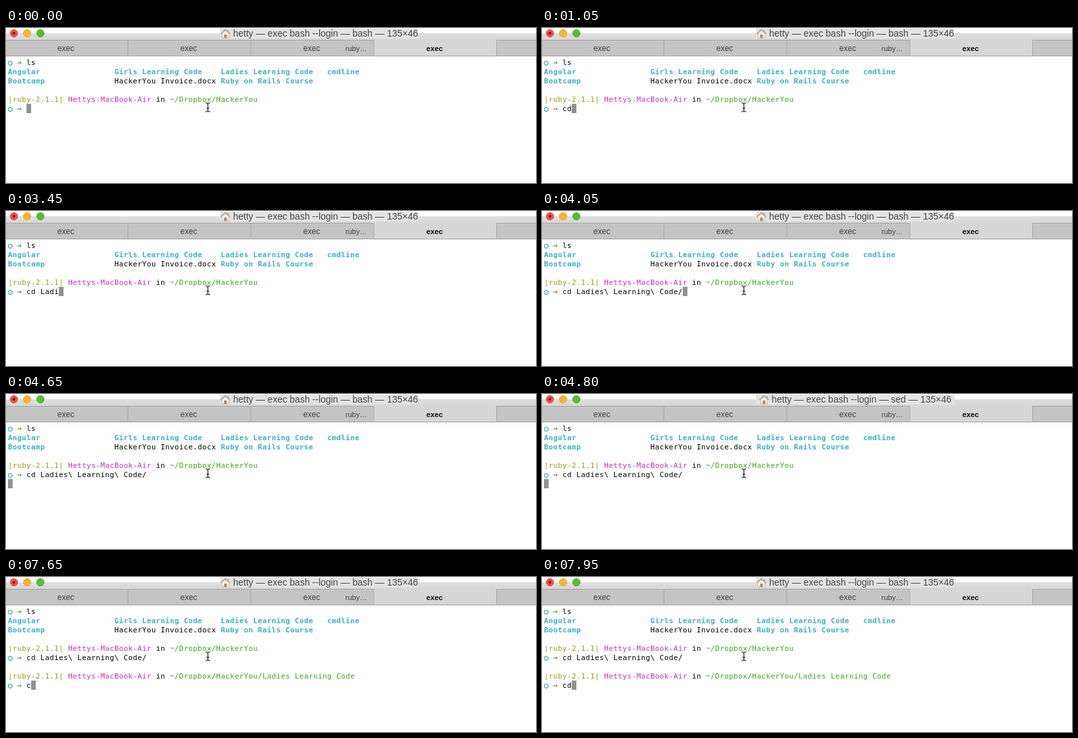
Animation, 802 px wide and 235 px high, one loop 8000 ms. Source, as an HTML page:

```html
<!DOCTYPE html>
<html lang="en">
<head>
<meta charset="utf-8">
<title>Terminal</title>
<style>
html, body { margin: 0; width: 100%; height: 100%; overflow: hidden; background: #fefefe; }
svg { position: absolute; left: 0; top: 0; }
svg text { font-family: "Liberation Sans", Arial, sans-serif; }
pre {
  position: absolute; left: 3px; top: 46px; margin: 0; color: #000;
  font: 11px/14px "DejaVu Sans Mono", monospace; letter-spacing: .378px; font-variant-ligatures: none;
}
pre b { color: #3cb0c4; }
.ring { color: #36a5be; -webkit-text-stroke: .5px; }
.arrow { color: #3fb01f; -webkit-text-stroke: .3px; }
.ruby { color: #9a9a1c; }
.host { color: #c42fc8; }
.path { color: #3fa81c; }
.cursor {
  display: inline-block; position: relative; top: -1px; width: 7px; height: 14px;
  vertical-align: top; background: #919191;
}
</style>
</head>
<body>
<pre id="screen"></pre>
<svg width="802" height="235">
  <linearGradient id="bar" x2="0" y2="1">
    <stop stop-color="#dedede"/>
    <stop offset="1" stop-color="#d6d6d6"/>
  </linearGradient>
  <rect y="8" width="802" height="11" fill="url(#bar)"/>
  <rect x="324" y="1" width="300" height="15" fill="#e3e3e3"/>
  <g stroke-width="1">
    <circle cx="12" cy="8" r="5.5" fill="#fc4f4b" stroke="#dd3c38"/>
    <circle cx="32" cy="8" r="5.5" fill="#fdb827" stroke="#dc9b22"/>
    <circle cx="52" cy="8" r="5.5" fill="#55bf2e" stroke="#43a324"/>
  </g>
  <circle cx="12" cy="8" r="1.9" fill="#5c0806"/>
  <g id="house">
    <path d="M326.5 8.5V15H337.5V8.5L332 3.5Z" fill="#f4ede4" stroke="#c3b9ae"/>
    <path d="M324.8 9L332 2.5L339.2 9M336.5 5.5V3" fill="none" stroke="#ac9b8f" stroke-width="1.3"/>
    <rect x="330" y="10" width="4" height="5" fill="#b08b6e"/>
  </g>
  <text id="title" y="13" font-size="14" text-anchor="end" fill="#444"></text>

  <rect y="19" width="802" height="23" fill="#c4c4c4"/>
  <rect x="557" y="18" width="185" height="24" fill="#d6d6d6"/>
  <path d="M0 18.5H557M742 18.5H802M0 42.5H802M184.5 19V42M370.5 19V42M556.5 19V42M742.5 19V42" stroke="#a6a6a6"/>
  <g font-size="12" text-anchor="middle" fill="#404040">
    <text x="90.5" y="35">exec</text>
    <text x="276.5" y="35">exec</text>
    <text x="462.5" y="35">exec</text>
    <text x="530" y="35" font-size="11">ruby…</text>
    <text x="648.5" y="35" font-size="11.3" font-weight="bold" fill="#111">exec</text>
  </g>

  <path d="M302 113.5Q305.5 113.5 305.5 116V124.5Q305.5 127 302 127M309 113.5Q305.5 113.5 305.5 116M305.5 124.5Q305.5 127 309 127M303.5 121.5H307.5" fill="none" stroke="#111" stroke-width="1.1"/>
</svg>
<script>
const LOOP = 8000, ENTER = 4650, BUSY = 4800, DONE = 4950;
const byId = id => document.getElementById(id);
const span = (name, text = '') => `<span class="${name}">${text}</span>`;

const prompt = `${span('ring', '○')} ${span('arrow', '→')} `;
const cursor = span('cursor');
const status = path =>
  `${span('ruby', '|ruby-2.1.1|')} ${span('host', 'Hettys-MacBook-Air')} in ${span('path', path)}\n`;
const bold = (text, width = 0) => `<b>${text.padEnd(width)}</b>`;

const history = prompt + 'ls\n'
  + bold('Angular', 23) + bold('Girls Learning Code', 23) + bold('Ladies Learning Code', 23) + bold('cmdline') + '\n'
  + bold('Bootcamp', 23) + 'HackerYou Invoice.docx'.padEnd(23) + bold('Ruby on Rails Course') + '\n\n'
  + status('~/Dropbox/HackerYou');

const command = 'cd Ladies\\ Learning\\ Code/';
const keyTimes = [600, 1050, 1650, 2700, 3000, 3150, 3450, 3750];
const completeAt = 4050;
const nextKeyTimes = [7650, 7950];

const typed = (text, times, t) => text.slice(0, times.filter(at => at <= t).length);

function screenAt(t) {
  const line = t < completeAt ? typed(command, keyTimes, t) : command;
  const start = history + prompt + line;
  if (t < ENTER) return start + cursor;
  if (t < DONE) return start + '\n' + cursor;
  return start + '\n\n' + status('~/Dropbox/HackerYou/Ladies Learning Code')
    + prompt + typed('cd', nextKeyTimes, t) + cursor;
}

let shown = '';
function draw() {
  const t = performance.now() % LOOP;
  const busy = t >= BUSY && t < DONE;
  const html = screenAt(t);
  if (html + busy !== shown) {
    shown = html + busy;
    byId('screen').innerHTML = html;
    byId('title').textContent = `hetty — exec bash --login — ${busy ? 'sed' : 'bash'} — 135×46`;
    byId('title').setAttribute('x', busy ? 619.5 : 623.5);
    byId('house').setAttribute('transform', `translate(${busy ? 4 : 0})`);
  }
  requestAnimationFrame(draw);
}
draw();
</script>
</body>
</html>
```
